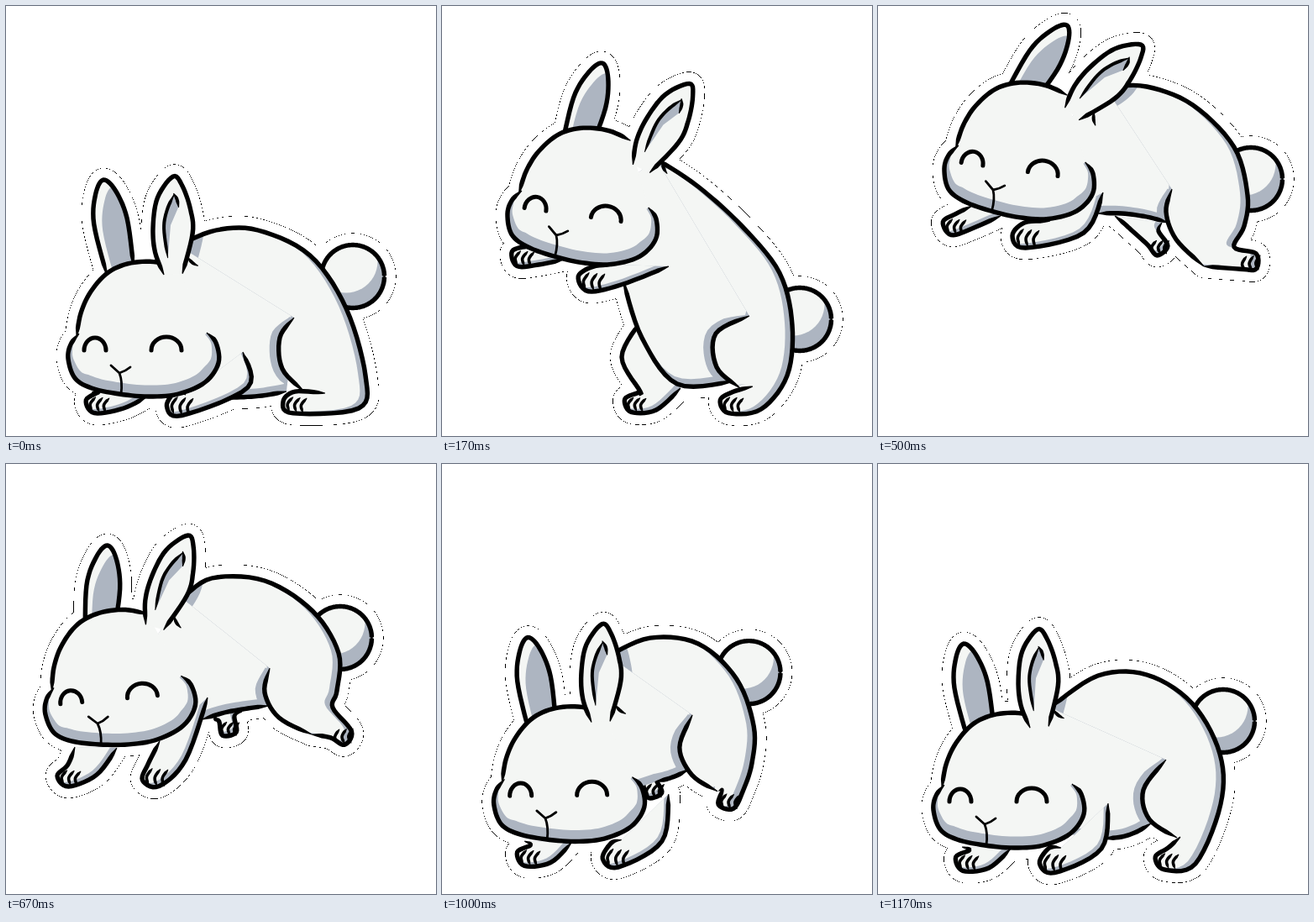
Animation, 512 px wide and 512 px high, one loop 1330 ms. Source, as an HTML page:

```html
<!DOCTYPE html>
<html lang="en">
<head>
<meta charset="utf-8">
<title>Hopping bunny</title>
<style>
  html, body { margin: 0; width: 100%; height: 100%; overflow: hidden; background: #fff; }
  svg { display: block; width: 100vw; height: 100vh; }
  .skin { fill: #f4f6f4; }
  .shade { fill: #adb5c1; }
  .face { fill: none; stroke: #000; stroke-linecap: round; stroke-linejoin: round; }
  .rim { stroke-linejoin: round; shape-rendering: crispEdges; }
</style>
</head>
<body>
<svg id="stage" viewBox="0 0 512 512"></svg>
<script>
const LOOP = 1330, INK = 5.4;

const parse = text => text.split(' ').map(p => p.split(',').map(Number));

// Samples of a smooth curve through the points.
function spline(pts, steps = 7) {
  const out = [];
  for (let i = 0; i < pts.length - 1; i++) {
    const b = pts[i], c = pts[i + 1], a = pts[i - 1] || b, e = pts[i + 2] || c;
    for (let s = 0; s < steps; s++) {
      const t = s / steps;
      out.push([0, 1].map(k => b[k] + t / 2 * (c[k] - a[k] +
        t * (2 * a[k] - 5 * b[k] + 4 * c[k] - e[k] +
        t * (3 * (b[k] - c[k]) + e[k] - a[k])))));
    }
  }
  return [...out, pts[pts.length - 1]];
}

const poly = pts => 'M' + pts.map(p => p.map(v => v.toFixed(1))).join('L') + 'Z';
const fill = (cls, pts) => `<path class="${cls}" d="${poly(pts)}"/>`;
const move = (pts, dx, dy) => pts.map(([x, y]) => [x + dx, y + dy]);
const place = ([x, y, a = 0], inner) =>
  `<g transform="translate(${x} ${y}) rotate(${a})">${inner}</g>`;

// A pen line that thins out over the given length at both ends.
function brush(pts, width = INK, taper = 14, cls = 'ink') {
  const run = spline(pts), dist = [0];
  for (let i = 1; i < run.length; i++)
    dist.push(dist[i - 1] + Math.hypot(run[i][0] - run[i - 1][0], run[i][1] - run[i - 1][1]));
  const total = dist[dist.length - 1];
  const side = sign => run.map(([x, y], i) => {
    const p = run[Math.max(i - 1, 0)], q = run[Math.min(i + 1, run.length - 1)];
    const dx = q[0] - p[0], dy = q[1] - p[1], len = Math.hypot(dx, dy) || 1;
    const thin = Math.min(1, 0.2 + Math.min(dist[i], total - dist[i]) / taper);
    const w = sign * width / 2 * thin / len;
    return [x - dy * w, y + dx * w];
  });
  return fill(cls, [...side(1), ...side(-1).reverse()]);
}

let clips = 0;
function clip(pts, inner) {
  const id = 'c' + clips++;
  return `<clipPath id="${id}"><path d="${poly(pts)}"/></clipPath>` +
    `<g clip-path="url(#${id})">${inner}</g>`;
}

// The light copy is shifted, so a band of shade stays on the far side.
const lit = (pts, dx, dy) => fill('shade', pts) + clip(pts, fill('skin', move(pts, dx, dy)));

// Rounded paw end at t, reached from k.
function cap(k, t, r) {
  const len = Math.hypot(t[0] - k[0], t[1] - k[1]);
  const dx = (t[0] - k[0]) / len * r, dy = (t[1] - k[1]) / len * r;
  return [[t[0] + dy, t[1] - dx], [t[0] + dx, t[1] + dy], [t[0] - dy, t[1] + dx]];
}

function toes(k, t, r) {
  const lean = Math.atan2(t[0] - k[0], Math.abs(t[0] - k[0]) * 1.5 + 20) / 2;
  const line = x => brush([[x + 3, -r * 0.5], [x - 3, r * 0.2], [x, r * 0.85]], 3.6, 5);
  return place([...t, -lean * 20], [-0.35, 0.3, 0.9].map(f => line(f * r)).join(''));
}

const limbPts = ([s, k, t, ...rest], r) => [s, k, ...cap(k, t, r), ...rest];
function limb(joints, r) {
  const pts = limbPts(joints, r);
  return lit(spline(pts), -5, -5) + brush(pts) + toes(joints[1], joints[2], r);
}

// Head around the nose, ears around their tips.
const crown = parse('72,-124 45,-132 14,-131 -13,-120 -34,-97 -46,-71 -51,-43');
const jaw = parse('-48,-47 -58,-34 -61,-17 -53,6 -33,18 0,25 35,28 70,25 102,11 118,-12 115,-36 104,-48');
const skull = [...spline(crown), ...spline(jaw), [76, -112]];
const farEar = parse('-15,113 -20,50 -12,15 0,0 12,15 20,50 18,108');
const nearEar = parse('-10,117 -20,90 -22,60 -16,25 3,0 14,12 23,40 25,68 12,116');
const innerEar = parse('-5,97 -9,62 -5,40 4,21');
const spike = parse('18,96 24,103 31,107');
const tail = Array.from({ length: 48 }, (_, i) =>
  [Math.cos(i * Math.PI / 24) * 37.5, Math.sin(i * Math.PI / 24) * 37.5]);

const eye = (x, rx, ry) =>
  `<path class="face" stroke-width="5" d="M${x - rx},-27A${rx} ${ry} 0 0 1 ${x + rx},-27"/>`;

const drawHead = () => fill('skin', skull) + clip(skull, brush(jaw.slice(1), 27, 70, 'shade')) +
  brush(crown) + brush(jaw) + eye(-29, 13, 15) + eye(56, 18, 16) +
  '<path class="face" stroke-width="2.8" d="M-10,-9L0,0Q7,-2 13,-7M0,0Q4,10 2,25"/>';

const drawFarEar = () => {
  const ear = spline(farEar);
  return fill('skin', ear) + clip(ear, fill('shade', move(ear, 9, 10))) + brush(farEar);
};

const drawNearEar = () => fill('skin', spline(nearEar)) +
  fill('shade', [...spline(innerEar), [9, 36], [-1, 58]]) +
  brush(nearEar) + brush(innerEar, 4) + brush([[3, 20], [7, 27], [9, 37]], 4, 8) +
  brush(spike, 4, 8);

// Key points: limbs run shoulder, wrist, paw, then back up the front side.
const rest = '262,420 262,432 256,440 248,430 247,425 246,420';
const crouch = {
  head: '135,437,0', farEar: '116,207,-9.7', nearEar: '196,203,-1', tail: '413,322',
  farArm: '168,465 140,479 108,472 102,460', nearArm: '282,412 288,454 206,473 214,463',
  farLeg: rest,
  back: '205,285 250,267 300,267 362,297 405,360 428,440', foot: '420,479 343,472 380,461',
  thigh: '355,459 329,432 326,395 343,371', belly: '250,466 275,466 305,464 334,459'
};
const rise = {
  head: '136,273,8', farEar: '191,68,18', nearEar: '292,91,28.5', tail: '426,373',
  farArm: '145,302 115,308 95,298 112,288', nearArm: '270,310 213,332 177,325 206,308',
  farLeg: '284,455 255,481 229,472 236,459 214,418 236,376',
  back: '255,182 305,215 358,263 402,318 417,380 411,440', foot: '380,480 344,472 370,453',
  thigh: '355,455 327,430 326,390 366,369', belly: '216,328 238,395 280,450 347,447'
};
const leap = {
  head: '137,219,8', farEar: '225,23,34', nearEar: '311,44,44', tail: '444,206',
  farArm: '146,250 112,265 90,260 112,238', nearArm: '268,222 245,270 175,273 205,256',
  farLeg: '338,258 334,268 333,285 303,268 292,258 282,250',
  back: '270,96 320,96 375,118 424,168 440,225 436,262', foot: '424,287 441,304 388,310',
  thigh: '388,310 355,278 343,245 350,218', belly: '262,247 290,247 320,251 346,258'
};
const dive = {
  head: '109,309,-5', farEar: '121,97,6', nearEar: '214,84,19', tail: '398,207',
  farArm: '132,338 108,370 74,371 82,337', nearArm: '240,278 214,352 176,370 183,330',
  farLeg: '281,295 272,300 264,313 249,304 250,300 251,297',
  back: '210,160 245,136 308,139 365,175 396,225 394,270', foot: '389,290 399,322 364,322',
  thigh: '364,322 325,302 308,272 314,243', belly: '234,304 260,296 288,291 312,288'
};
const land = {
  head: '100,381,-4', farEar: '103,164,0', nearEar: '191,154,10', tail: '341,217',
  farArm: '134,409 114,438 85,432 88,410', nearArm: '246,330 238,400 198,430 190,394',
  farLeg: '262,340 252,346 248,358 244,348 245,344 246,340',
  back: '195,195 240,183 297,194 338,240 352,295 348,330', foot: '348,342 339,361 313,360',
  thigh: '313,360 284,342 265,310 274,270', belly: '246,342 256,338 266,334 277,329'
};
const settle = {
  head: '127,429,0', farEar: '102,214,-10', nearEar: '187,197,-2', tail: '411,306',
  farArm: '158,458 132,481 105,472 100,456', nearArm: '274,404 266,458 207,472 218,457',
  farLeg: rest,
  back: '205,290 262,252 320,251 374,285 407,345 408,405', foot: '378,476 343,470 360,444',
  thigh: '356,445 323,423 316,388 343,352', belly: '268,446 290,444 308,438 325,428'
};

const FRONT = ['head', 'farEar', 'nearEar', 'farArm', 'nearArm'];
const read = pose => Object.fromEntries(Object.entries(pose).map(([k, v]) => [k, parse(v)]));

// In-between pose; front and rear of the body may be at different stages.
function mix(a, b, front, rear) {
  const from = read(a), to = read(b);
  for (const key in from) {
    const w = FRONT.includes(key) ? front : rear;
    from[key] = from[key].map((p, i) => p.map((v, k) => v + (to[key][i][k] - v) * w));
  }
  return from;
}

const cycle = [
  [0, read(crouch)], [170, read(rise)], [330, mix(rise, leap, 0.5, 0.6)], [500, read(leap)],
  [670, read(dive)], [830, read(land)], [1000, mix(land, settle, 0.85, 0.35)], [1170, read(settle)]
];

function build(p) {
  const [head] = p.head, [ear1] = p.farEar, [ear2] = p.nearEar, [tailAt] = p.tail;
  const [heel, paw, instep] = p.foot;
  const rump = [...p.back, heel, ...cap(heel, paw, 13), instep];
  const haunch = [...spline(rump), ...spline(p.thigh)];
  const belly = [p.back[0], p.thigh[3], ...spline(p.belly).reverse(), head.slice(0, 2)];

  const arm = (key, r) => fill('', spline(limbPts(p[key], r)));
  const shape = place(tailAt, fill('', tail)) + place(ear1, fill('', spline(farEar))) +
    arm('farLeg', 12) + arm('farArm', 13) + fill('', belly) + fill('', haunch) +
    arm('nearArm', 15) + place(head, fill('', skull)) + place(ear2, fill('', spline(nearEar)));
  const rim = (color, w) =>
    `<g class="rim" fill="${color}" stroke="${color}" stroke-width="${w}">${shape}</g>`;

  const earShadow = place([ear2[0] + 13, ear2[1] + 2, ear2[2]], fill('shade', spline(nearEar)));
  return '<g display="none">' + rim('#000', 28.2) + rim('#fff', 27.5) +
    place(tailAt, lit(tail, -8, -18) + brush([...tail, tail[0]], INK, 1)) +
    place(ear1, drawFarEar()) + limb(p.farLeg, 12) + limb(p.farArm, 13) +
    lit(belly, -3, -9) + clip(belly, brush(move(p.thigh, -4, 0), 14, 30, 'shade')) +
    brush(p.belly) + lit(haunch, -9, -3) + clip(haunch, earShadow) +
    brush(rump) + brush(p.thigh, INK, 18) + toes(heel, paw, 13) +
    limb(p.nearArm, 15) + place(head, drawHead()) + place(ear2, drawNearEar()) + '</g>';
}

const stage = document.getElementById('stage');
stage.innerHTML = cycle.map(([, pose]) => build(pose)).join('');
const groups = [...stage.children];
let shown = null;

function show(t) {
  const next = groups[cycle.filter(([at]) => at <= t).length - 1];
  if (next === shown) return;
  if (shown) shown.setAttribute('display', 'none');
  next.removeAttribute('display');
  shown = next;
}

const start = performance.now();
function tick() {
  show((performance.now() - start) % LOOP);
  requestAnimationFrame(tick);
}
tick();
</script>
</body>
</html>
```
